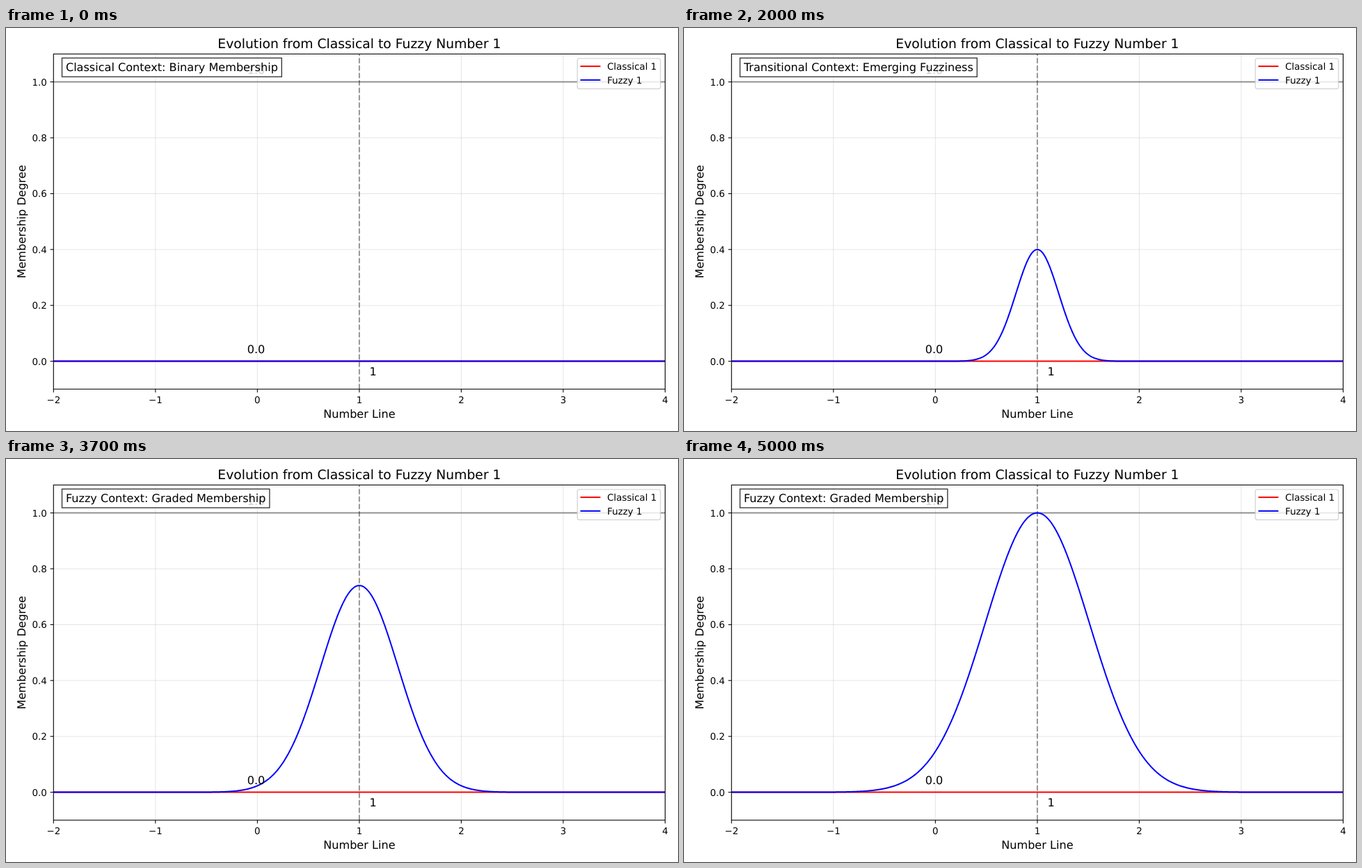
An HTML page for the animation above (5.05 s loop, 966 by 580 pixels).

```html
<!DOCTYPE html>
<html lang="en">
<head>
<meta charset="utf-8">
<title>Classical to fuzzy number</title>
<style>
  html, body { margin: 0; width: 100%; height: 100%; overflow: hidden; background: #fff; }
  svg { display: block; width: 966px; height: 580px; }
  text { font-family: "DejaVu Sans", sans-serif; text-rendering: geometricPrecision; white-space: pre; }
</style>
</head>
<body>
<svg id="chart" viewBox="0 0 966 580"></svg>
<script>
const LEFT = 68.3, RIGHT = 947.5, TOP = 37.4, BOTTOM = 519.8;
const SMALL = 13.42, MEDIUM = 16.1, LARGE = 18.78;
const STEP_MS = 50, STEPS = 101;
const chart = document.getElementById("chart");

const px = x => LEFT + (x + 2) * (RIGHT - LEFT) / 6;
const py = y => BOTTOM - (y + 0.1) * (BOTTOM - TOP) / 1.2;

function add(tag, attributes, content = "") {
  const node = document.createElementNS("http://www.w3.org/2000/svg", tag);
  for (const name in attributes) node.setAttribute(name, attributes[name]);
  node.textContent = content;
  chart.append(node);
  return node;
}
const line = (x1, y1, x2, y2, stroke, width, extra) =>
  add("line", { x1, y1, x2, y2, stroke, "stroke-width": width, ...extra });
const label = (x, y, content, size, anchor = "start", extra) =>
  add("text", { x, y, "font-size": size, "text-anchor": anchor, ...extra }, content);
const curve = color =>
  add("path", { fill: "none", stroke: color, "stroke-width": 2, "stroke-linejoin": "round" });

// Grid, ticks and tick labels
for (let x = -2; x <= 4; x++) {
  line(px(x), TOP, px(x), BOTTOM, "#b0b0b0", 1.07, { opacity: 0.3 });
  line(px(x), BOTTOM, px(x), BOTTOM + 4.7, "#000", 1.07);
  label(px(x), 539.8, String(x).replace("-", "\u2212"), SMALL, "middle");
}
for (let i = 0; i <= 5; i++) {
  const y = py(i / 5);
  line(LEFT, y, RIGHT, y, "#b0b0b0", 1.07, { opacity: 0.3 });
  line(LEFT - 4.7, y, LEFT, y, "#000", 1.07);
  label(58.9, y + 5, (i / 5).toFixed(1), SMALL, "end");
}

// Reference lines and curves
line(LEFT, py(1), RIGHT, py(1), "#000", 2, { opacity: 0.38 });
line(px(1), BOTTOM, px(1), TOP, "#000", 2, { opacity: 0.38, "stroke-dasharray": "7.44 3.22" });
const classical = curve("#f00");
const fuzzy = curve("#00f");
classical.setAttribute("d", `M${LEFT} ${py(0)}H${RIGHT}`);
add("rect", { x: LEFT, y: TOP, width: RIGHT - LEFT, height: BOTTOM - TOP,
  fill: "none", stroke: "#000", "stroke-width": 1.07 });

// Annotations and titles
label(px(-0.1), py(0.03), "0.0", MEDIUM);
label(px(-0.1), py(1.03), "1.0", MEDIUM);
label(px(1.1), py(-0.05), "1", MEDIUM);
const contextBox = add("rect", { x: 80.5, y: 43.2, height: 27, fill: "#fff", stroke: "#000",
  "stroke-width": 1.34, "fill-opacity": 0.8, "stroke-opacity": 0.8 });
const contextText = label(85.9, 61.5, "", MEDIUM);
const middleX = (LEFT + RIGHT) / 2, middleY = (TOP + BOTTOM) / 2;
label(middleX, 29.3, "Evolution from Classical to Fuzzy Number 1", LARGE, "middle");
label(middleX, 561, "Number Line", MEDIUM, "middle");
label(0, 0, "Membership Degree", MEDIUM, "middle",
  { transform: `translate(28 ${middleY}) rotate(-90)` });

// Legend
add("rect", { x: 821.3, y: 43.9, width: 119.5, height: 43.6, rx: 2.7, fill: "#fff", stroke: "#ccc",
  "stroke-width": 1.34, "fill-opacity": 0.8, "stroke-opacity": 0.8 });
[["Classical 1", "#f00"], ["Fuzzy 1", "#00f"]].forEach(([name, color], i) => {
  const y = 55.1 + i * 19.7;
  line(826.6, y, 853.5, y, color, 2, { "stroke-linecap": "square" });
  label(864.2, y + 5, name, SMALL);
});

function contextAt(level) {
  if (level < 0.1) return "Classical Context: Binary Membership";
  if (level < 0.5) return "Transitional Context: Emerging Fuzziness";
  return "Fuzzy Context: Graded Membership";
}

// The bell grows in height and spread together
function bellPath(level) {
  const sigma = 0.01 + 0.5 * level;
  const points = Array.from({ length: 1000 }, (_, i) => {
    const x = -2 + 6 * i / 999;
    const y = level * Math.exp(-((x - 1) ** 2) / (2 * sigma ** 2));
    return `${px(x).toFixed(2)} ${py(y).toFixed(2)}`;
  });
  return "M" + points.join("L");
}

let shownStep = -1;
const start = performance.now();
function draw() {
  const step = Math.floor((performance.now() - start) / STEP_MS) % STEPS;
  if (step !== shownStep) {
    shownStep = step;
    const level = step / 100;
    fuzzy.setAttribute("d", bellPath(level));
    contextText.textContent = contextAt(level);
    contextBox.setAttribute("width", contextText.getComputedTextLength() + 10.8);
  }
  requestAnimationFrame(draw);
}
draw();
</script>
</body>
</html>
```
